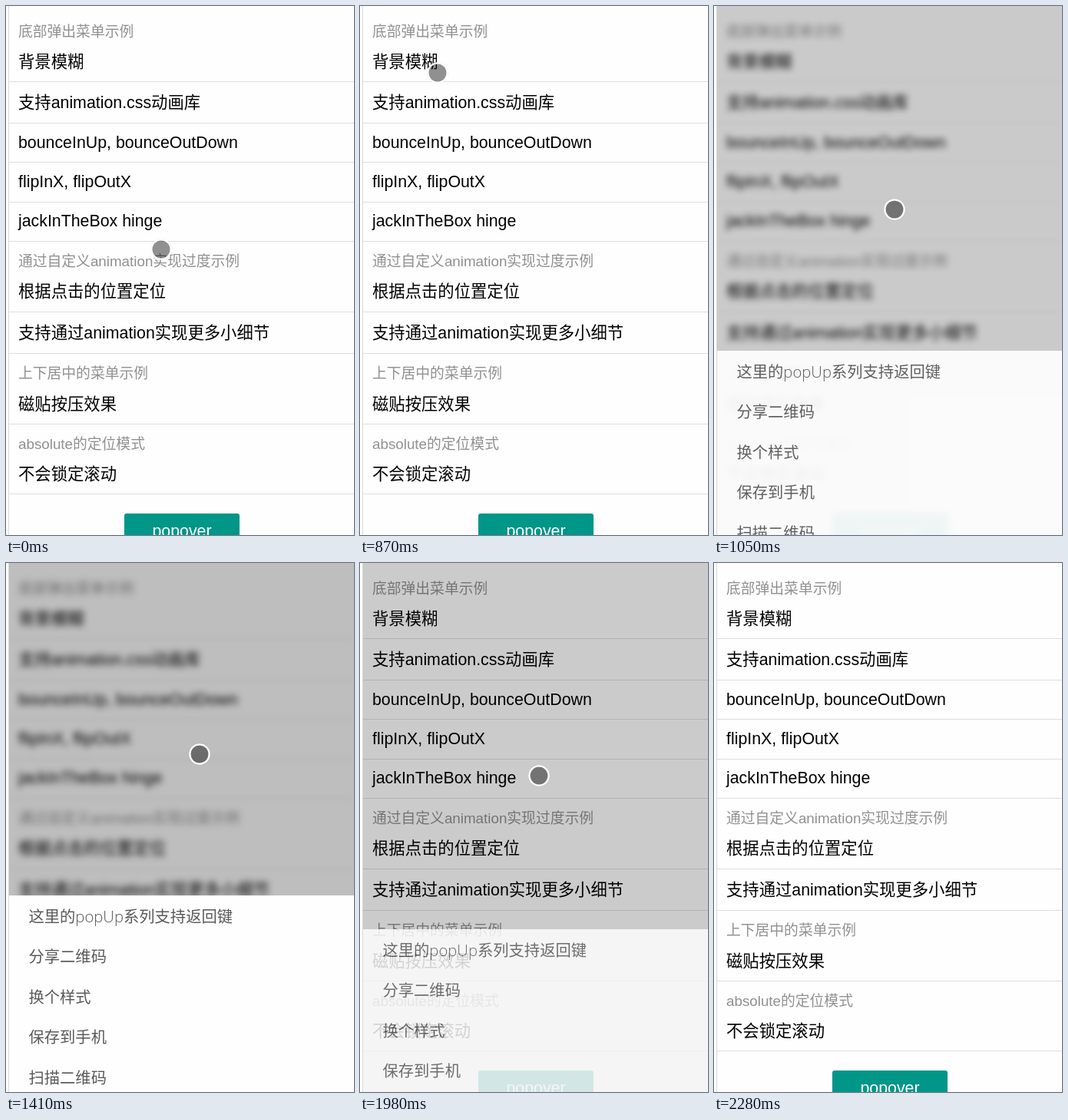
Animation, 453 px wide and 689 px high, one loop 2980 ms. Source, as an HTML page:

```html
<!DOCTYPE html>
<html lang="zh-CN">
<head>
<meta charset="utf-8">
<style>
html, body { margin: 0; width: 100%; height: 100%; overflow: hidden; background: #fff; }
svg { display: block; }
text { font: 350 21.33px "Liberation Sans", Arial, "Noto Sans CJK SC", "Noto Sans CJK", sans-serif; }
.title { font-size: 18.8px; fill: #909090; }
#sheet text { font: 350 20.3px "Open Sans", "Noto Sans CJK SC", "Noto Sans CJK", sans-serif; fill: #595959; }
</style>
</head>
<body>
<svg width="453" height="689" viewBox="0 0 453 689">
  <rect x="4" width="449" height="689" fill="#fefefe"/>
  <g id="page">
    <rect x="154" y="661" width="150" height="48" rx="3" fill="#009688"/>
    <text x="229" y="690.5" text-anchor="middle" fill="#fff">popover</text>
  </g>
  <rect id="shade" x="4" width="449" height="689"/>
  <g id="sheet"><rect x="4" y="433" width="449" height="256" fill="#fefefe"/></g>
  <rect x="3" width="1" height="689" fill="#d9d9d9"/>
  <g id="cursor">
    <circle r="13.8" fill="none" stroke="#000" stroke-opacity=".15" stroke-width=".6"/>
    <circle r="12.5" fill="none" stroke="#fff" stroke-width="2.6"/>
    <circle r="11.5" fill-opacity=".43"/>
  </g>
</svg>
<script>
const LOOP = 2980;
const $ = id => document.getElementById(id);
const [page, shade, sheet, cursor] = ['page', 'shade', 'sheet', 'cursor'].map($);

function add(parent, tag, attrs, content = '') {
  const el = document.createElementNS('http://www.w3.org/2000/svg', tag);
  for (const key in attrs) el.setAttribute(key, attrs[key]);
  el.textContent = content;
  parent.append(el);
}

// [baseline, label, is a section title]
const rows = [
  [40, '底部弹出菜单示例', 1], [80, '背景模糊'], [133, '支持animation.css动画库'],
  [185, 'bounceInUp, bounceOutDown'], [236, 'flipInX, flipOutX'], [287, 'jackInTheBox hinge'],
  [339, '通过自定义animation实现过度示例', 1], [379, '根据点击的位置定位'],
  [433, '支持通过animation实现更多小细节'], [485, '上下居中的菜单示例', 1], [526, '磁贴按压效果'],
  [577, 'absolute的定位模式', 1], [617, '不会锁定滚动']
];
for (const [y, label, title] of rows) add(page, 'text', { x: 16, y, class: title ? 'title' : '' }, label);
for (const y of [98, 152, 203, 255, 306, 398, 452, 544, 635])
  add(page, 'rect', { x: 4, y, width: 449, height: 1, fill: '#dedede' });

['这里的popUp系列支持返回键', '分享二维码', '换个样式', '保存到手机', '扫描二维码']
  .forEach((label, i) => add(sheet, 'text', { x: 29.5, y: 467.5 + 52.5 * i }, label));

// Cursor stops: [time, x, y]
const stops = [
  [0, 202, 317], [280, 202, 317], [580, 98, 21], [720, 101, 87], [890, 101, 87], [980, 226, 262],
  [1050, 235, 265], [1170, 252, 249], [1410, 252, 249], [1590, 236, 288], [1770, 236, 288],
  [1980, 233, 277], [2280, 470, 710], [LOOP, 470, 710]
];
const clamp = v => Math.max(0, Math.min(1, v));

function cursorAt(t) {
  const i = stops.findIndex(s => s[0] > t);
  const [t0, x0, y0] = stops[i - 1], [t1, x1, y1] = stops[i];
  const k = (t - t0) / (t1 - t0), e = k * k * (3 - 2 * k);
  return [x0 + (x1 - x0) * e, y0 + (y1 - y0) * e];
}

function draw(now) {
  const t = now % LOOP;
  const opening = t < 900 ? 0 : clamp((t - 848) / 252);
  const closing = clamp((t - 1936) / 220);
  const hidden = closing ? closing ** 1.11 : (1 - opening) ** 1.7;
  page.style.filter = opening && !closing ? 'blur(4px)' : 'none';
  shade.setAttribute('fill-opacity', 0.253 * (opening - closing));
  sheet.setAttribute('opacity', 1 - hidden);
  sheet.setAttribute('transform', `translate(0 ${Math.round(256 * hidden)})`);
  cursor.setAttribute('transform', `translate(${cursorAt(t)})`);
}

const start = performance.now();
function tick() {
  draw(performance.now() - start);
  requestAnimationFrame(tick);
}
tick();
</script>
</body>
</html>
```
